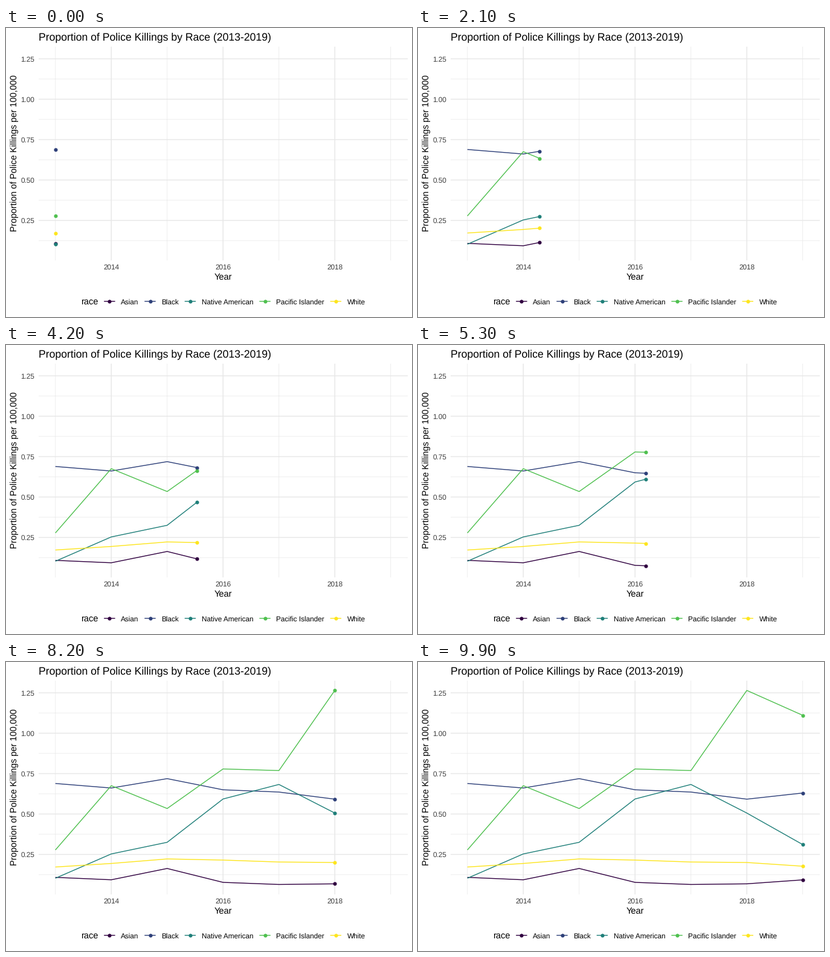
Recreate the animation shown at these times as a matplotlib script. Size 672 px wide and 480 px high, loop 10 s.

```python
import numpy as np
import matplotlib.pyplot as plt
from matplotlib.animation import FuncAnimation
from matplotlib.lines import Line2D

plt.rcParams.update({
    "font.family": "Liberation Sans",
    "text.hinting": "none",
    "path.snap": False,
})

W, H, DPI = 672, 480, 96
PX = 72 / DPI  # points per pixel
FRAMES, INTERVAL = 100, 100
LEFT, RIGHT, TOP, BOTTOM = 54, 664.5, 31.1, 385.6

YEARS = np.arange(2013, 2020)
# name, colour, rate per year, legend key centre
SERIES = [
    ("Asian", "#300040", [.108, .093, .163, .077, .064, .068, .0925], 171.4),
    ("Black", "#2e4079", [.689, .661, .719, .650, .636, .592, .630], 238.5),
    ("Native American", "#1f7f79", [.1025, .253, .325, .593, .683, .506, .311], 304.9),
    ("Pacific Islander", "#4fc04f", [.2776, .6755, .534, .779, .769, 1.265, 1.111], 428.6),
    ("White", "#fde51e", [.172, .194, .222, .215, .203, .200, .177], 545.8),
]
# Every year lands on a whole frame
KEYS = np.round(np.linspace(0, FRAMES - 1, len(YEARS)))

LINE = dict(lw=1.42 * PX, solid_capstyle="butt", solid_joinstyle="round")
DOT = dict(marker="o", ms=6.15 * PX, mew=0, ls="none")

fig = plt.figure(figsize=(W / DPI, H / DPI), dpi=DPI, facecolor="white")
ax = fig.add_axes([LEFT / W, 1 - BOTTOM / H, (RIGHT - LEFT) / W, (BOTTOM - TOP) / H])
ax.set(xlim=(2012.7, 2019.3), ylim=(.004, 1.325))
ax.axis("off")


def label(x, y, text, size=8.8, color="black", ha="left", **kw):
    """Text with its baseline at pixel (x, y), measured from the top left."""
    fig.text(x / W, 1 - y / H, text, fontsize=size, color=color,
             ha=ha, va=kw.pop("va", "baseline"), **kw)


def grid(xs, ys, width):
    style = dict(color="#e7e7e7", lw=width * PX, zorder=1)
    for y in ys:
        ax.axhline(y, **style)
    for x in xs:
        ax.axvline(x, **style)


def legend_key(x, y, color):
    for xs, style in (([x - 9.2, x + 9.2], LINE), ([x], DOT)):
        ys = [H - y] * len(xs)
        fig.add_artist(Line2D(xs, ys, color=color, transform=None, **style))


x_ticks = (2014, 2016, 2018)
y_ticks = np.arange(.25, 1.3, .25)
grid(range(2013, 2020, 2), y_ticks - .125, .71)
grid(x_ticks, y_ticks, 1.42)

TICK = "#3d3d3d"
for x in x_ticks:
    px = LEFT + (x - 2012.7) / 6.6 * (RIGHT - LEFT)
    label(px, 401, str(x), color=TICK, ha="center")
for y in y_ticks:
    py = BOTTOM - (y - .004) / 1.321 * (BOTTOM - TOP)
    label(47.4, py + 4.2, f"{y:.2f}", color=TICK, ha="right")

MID_X, MID_Y = (LEFT + RIGHT) / 2, (TOP + BOTTOM) / 2
label(LEFT, 20, "Proportion of Police Killings by Race (2013-2019)", 13.2)
label(MID_X, 418, "Year", 11, ha="center")
label(18, MID_Y, "Proportion of Police Killings per 100,000", 11, ha="right",
      va="center", rotation=90, rotation_mode="default") if False else \
    label(18, MID_Y, "Proportion of Police Killings per 100,000", 11, ha="center",
          rotation=90, rotation_mode="anchor")

label(124, 459, "race", 11)
lines, dots = [], []
for i, (name, color, _, key_x) in enumerate(SERIES):
    legend_key(key_x, 454, color)
    label(key_x + 18.85, 459, name)
    lines += ax.plot([], [], color=color, zorder=3 + i, clip_on=False, **LINE)
    dots += ax.plot([], [], color=color, zorder=10 + i, clip_on=False, **DOT)


def update(k):
    now = np.interp(k, KEYS, YEARS)
    past = YEARS[YEARS < now]
    xs = np.append(past, now)
    for (_, _, rates, _), line, dot in zip(SERIES, lines, dots):
        ys = np.interp(xs, YEARS, rates)
        line.set_data(xs, ys)
        dot.set_data(xs[-1:], ys[-1:])
    return lines + dots


anim = FuncAnimation(fig, update, frames=FRAMES, interval=INTERVAL,
                     repeat=True, repeat_delay=0, blit=False)
plt.show()
```
